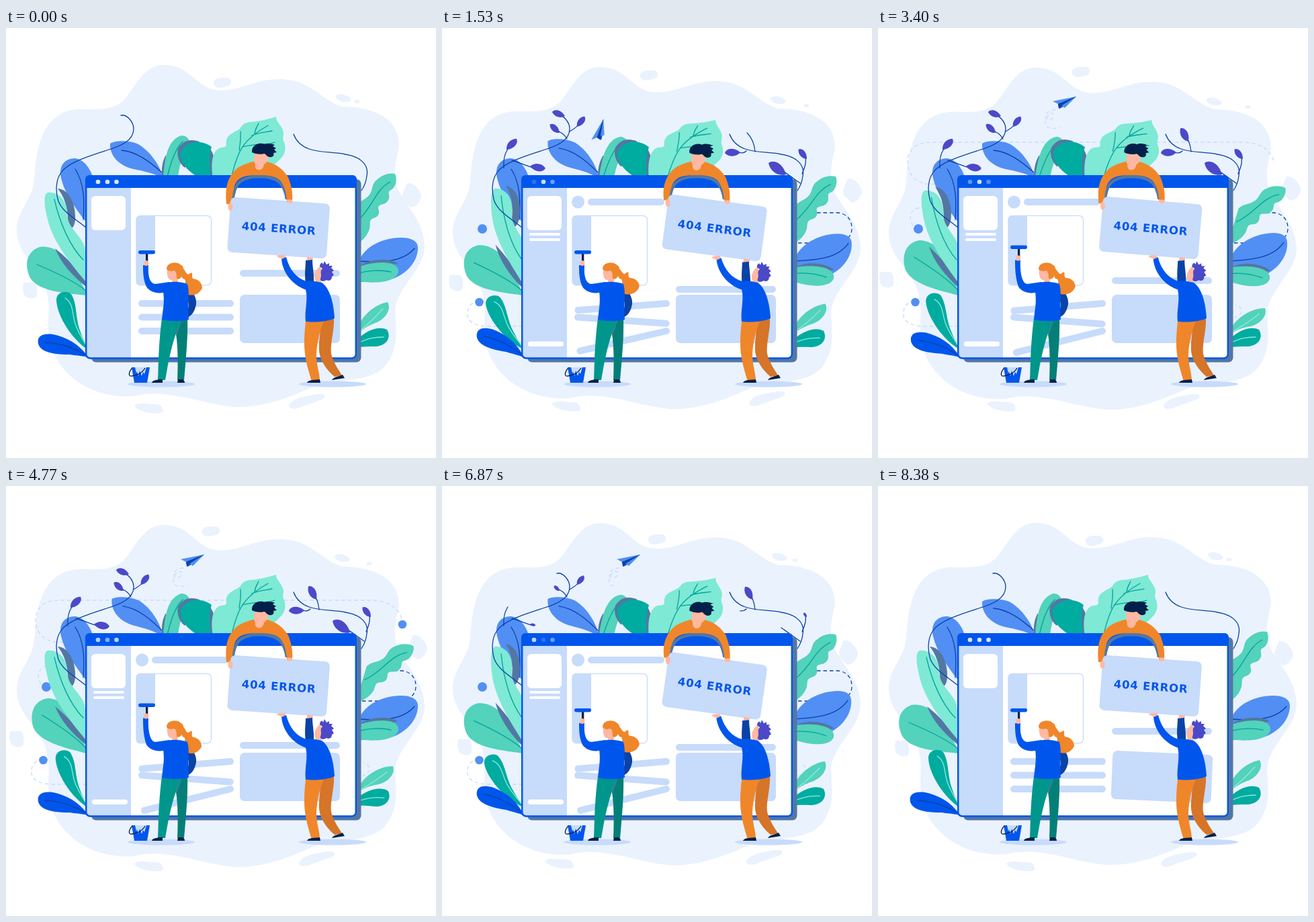
An HTML page that plays this animation: 640x640 px, repeating every 8420 ms.

```html
<!DOCTYPE html>
<html lang="en">
<head>
<meta charset="utf-8">
<title>404 error</title>
<style>
html, body { margin: 0; width: 100%; height: 100%; overflow: hidden; background: #fff }
svg { display: block; width: 100vw; height: 100vh }
.cloud { fill: #eaf2fe } .pale { fill: #c7dbfb } .blue { fill: #0056ec } .sky { fill: #528ff4 }
.deep { fill: #0a42a6 } .mint { fill: #7ee9d5 } .green { fill: #53d2bc } .teal { fill: #00aba0 }
.shade { fill: #5377a3 } .orange { fill: #f0862a } .skin { fill: #ffb8a2 } .navy { fill: #03204a }
.bud { fill: #4b49c8 } .white { fill: #fff }
.vein, .stem, .dash { fill: none; stroke-width: 1.3; stroke-linecap: round }
.vein { stroke: #00a499 } .vein.light { stroke: #8cecdc } .vein.dark, .stem { stroke: #0a42a6 }
.dash { stroke: #c7dbfb; stroke-linecap: butt }
text { font: bold 16.5px "DejaVu Sans", sans-serif; letter-spacing: .8px }
</style>
</head>
<body>
<svg viewBox="0 0 640 640">
<path id="cloud" class="cloud" d="M238 55C275 57 280 85 310 92C345 97 370 75 410 76C455 78 465 105 500 117C540 117 585 130 585 175C580 200 575 215 583 240C600 270 622 290 623 325C622 360 582 385 579 420C580 445 585 470 570 495C550 530 500 520 460 533C420 550 385 565 340 564C290 560 240 535 190 548C130 552 80 520 66 470C58 430 70 420 58 385C48 350 15 340 16 297C18 270 40 255 42 225C45 200 45 140 90 124C120 115 150 130 175 108C195 85 205 53 238 55Z"/>
<g class="cloud">
  <path data-x="0,-14,-20,-17,-9,-2" data-y="0,-11,-16,-14,-7,-2" d="M309 80C311 73 322 74 329 74C338 75 337 86 328 87C318 91 307 89 309 80Z"/>
  <path data-x="0,-2,-2,-2,0,0" data-y="0,3,5,3,2,1" d="M491 101C496 96 506 99 511 103C517 106 512 111 505 110C499 111 490 106 491 101Z"/>
  <ellipse data-x="0,20,28,18,10,3" data-y="0,6,8,6,3,1" cx="522.500" cy="109.500" rx="4" ry="2.500"/>
  <path data-x="0,7,11,9,6,1" data-y="0,-7,-10,-9,-4,-1" d="M597 231C607 229 618 243 618 252C615 261 608 269 601 266C596 259 587 257 591 245Z"/>
  <path data-x="0,-15,-23,-20,-10,-2" data-y="0,-11,-16,-14,-7,-2" d="M26 379L42 379C47 383 46 392 46 398C44 404 35 403 30 400C24 396 25 386 26 379Z"/>
  <path data-x="0,-28,-29,0,-9,-38" data-y="0,-3,-3,0,-1,-4" d="M191 562C197 556 213 560 223 560C234 560 236 572 231 573C216 575 197 571 191 562Z"/>
  <path data-x="0,36,4,15,32,32" data-y="0,-4,0,-1,-3,-3" d="M421 562C427 549 449 548 463 545C476 544 478 549 470 553C457 558 446 561 434 566C427 568 421 566 421 562Z"/>
</g>

<path class="dash" data-show="500,1400,7050,7900" style="stroke:#0a42a6" d="M530 320H585C599 319 610 312 610 298C610 287 604 277 590 275H543"/>
<path class="dash" data-show="800,1500,6900,7700" d="M55 408C40 407 37 420 38 428C40 440 55 444 70 444H119"/>
<path class="dash" data-show="1550,2200,6000,6800" d="M60 299C45 296 43 268 62 268H90"/>
<path class="dash" data-show="1550,3500,5000,6600" d="M85 232C60 235 44 220 44 200C44 180 58 170 80 170H540C572 170 589 184 590 206"/>
<path class="dash" data-show="1550,2300,6300,8420" d="M264 122C255 122 248 127 250 135C258 139 264 133 260 127C251 126 246 142 251 147C257 150 264 150 271 148"/>
<path class="dash" data-show="1550,2100,6700,7300" d="M530 432C545 425 545 418 532 412"/>
<g class="sky">
  <circle data-grow="500,1100,7200,7900" cx="60" cy="299" r="7"/>
  <circle data-grow="700,1300,7300,8000" cx="55.500" cy="408" r="6.300"/>
  <circle data-grow="3500,3900,4850,5200" cx="590" cy="206" r="6.300"/>
</g>
<g id="plane"><path class="sky" d="M-17 -1L18 -8L-7 10L-9 3Z"/><path class="blue" d="M-9 3L18 -8L-1 7L-7 10Z"/><path class="sky" d="M-4 5L18 -8L1 9Z"/><path class="deep" d="M-9 3L18 -8L-3 5L-8 10Z"/></g>

<!-- plants on the right -->
<g data-pivot="521,320" data-a="0,4,17,17,15,4">
  <path class="green" d="M521 322V266C527 256 535 256 541 248C547 240 543 232 553 225C560 218 572 215 579 217C583 225 580 238 573 241C566 244 573 250 569 256C565 265 555 260 554 268C557 276 554 281 547 283C539 286 543 293 541 299C537 312 528 318 521 322Z"/>
  <path class="vein" d="M524 286C545 268 550 240 572 229"/>
</g>
<g data-pivot="521,362" data-a="0,-5,-6,0,-1,-6">
  <path class="sky" d="M521 362C524 335 545 318 575 313C597 310 612 314 613 326C614 350 590 376 552 378L521 378Z"/>
  <path class="vein dark" d="M522 347C560 349 590 349 608 328"/>
</g>
<g data-pivot="521,362" data-a="0,9,10,0,3,10">
  <path class="shade" d="M521 358C540 342 568 342 583 350L560 358L521 368Z"/>
  <path class="green" d="M521 357C545 347 585 344 584 363C581 378 550 382 521 376Z"/>
  <path class="vein" d="M521 366C540 360 560 360 573 363"/>
</g>
<g data-pivot="521,458" data-a="0,3,10,10,9,2">
  <path class="green" d="M521 458C522 435 545 412 568 408C575 420 562 436 547 440C538 444 530 448 521 458Z"/>
  <path class="vein light" d="M521 455C535 445 550 430 561 418"/>
</g>
<g data-pivot="521,468" data-a="0,2,0,6,6,2">
  <path class="teal" d="M521 466C535 450 555 443 567 449C574 460 567 473 550 474C540 474 530 474 521 476Z"/>
  <path class="vein light" d="M521 470C540 461 550 460 562 460"/>
</g>

<!-- plants on the left -->
<g data-pivot="120,290" data-a="0,0,0,0,2,0">
  <path class="sky" d="M120 290C100 265 84 240 81 218C80 200 92 194 103 194C117 196 126 210 130 225V290Z"/>
  <path class="vein dark" d="M103 210C116 230 117 255 115 285"/>
</g>
<g data-pivot="120,395" data-a="0,2,9,9,7,2">
  <path class="green" d="M120 398C100 395 50 395 36 372C26 350 32 332 50 326C75 322 95 345 105 365C112 380 118 388 120 398Z"/>
  <path class="vein" d="M46 352C70 362 100 375 119 391"/>
</g>
<g data-pivot="119,375" data-a="0,7.5,3.5,0,3.500,7.5">
  <path class="shade" d="M77 239C94 240 104 262 103 285C102 297 97 301 93 296C91 285 95 262 77 239ZM73 328C92 344 108 360 119 375V385C98 368 82 350 73 328Z"/>
  <path class="mint" d="M119 378C100 355 70 320 62 285C57 265 55 248 62 245C76 243 91 254 91 278C92 298 112 308 117 326C120 345 119 360 119 378Z"/>
  <path class="vein" d="M72 255C80 290 95 325 115 345"/>
</g>
<g data-pivot="121,478" data-a="0,-8,-3,-1,-10,-10">
  <path class="teal" d="M121 478C100 465 76 430 75 405C75 392 90 390 97 396C106 410 103 430 110 450C114 462 118 470 121 478Z"/>
  <path class="vein light" d="M88 402C101 410 98 425 103 440C108 455 116 465 121 476"/>
</g>
<g data-pivot="120,488" data-a="0,9,3,0,9,9">
  <path class="blue" d="M121 488C108 470 90 460 70 456C52 454 46 460 48 470C52 484 75 486 95 486C108 488 115 488 121 490Z"/>
  <path class="vein dark" d="M58 468C80 469 100 475 119 487"/>
</g>

<!-- plants on top -->
<g data-pivot="232,219" data-a="0,3,0,3,0,3">
  <path class="sky" d="M234 224C230 205 214 182 195 172C180 166 160 168 155 172C154 190 168 205 190 210C205 213 220 216 234 224Z"/>
  <path class="vein dark" d="M172 182C195 184 215 200 232 215"/>
</g>
<g data-pivot="240,222" data-a="0,4,4,0,0,4">
  <path class="shade" d="M232 222C231 205 234 196 238 189V222Z"/>
  <path class="green" d="M234 222C236 195 240 165 262 160C270 161 275 166 272 176C262 190 258 205 256 222Z"/>
  <path class="vein" d="M240 222C245 200 252 180 263 169"/>
</g>
<g data-pivot="300,224" data-a="0,2.500,2.500,0,0,2.500">
  <path class="shade" d="M256 180C264 166 275 165 288 169L266 208C257 200 254 190 256 180ZM300 176C311 185 313 205 314 224H300Z"/>
  <path class="teal" d="M259 186C267 168 290 165 306 177C302 190 302 205 306 224H290C270 214 259 200 259 186Z"/>
</g>
<g data-pivot="325,222" data-a="0,3.500,3.500,0,.5,3.500">
  <path class="mint" d="M308 225C305 205 306 190 313 182C320 175 325 180 328 175C326 160 335 158 345 152C352 148 350 142 362 140C375 139 390 136 402 132C402 140 408 142 412 152C415 158 410 163 414 170C418 180 414 190 408 195C395 210 370 225 340 225Z"/>
  <path class="vein" d="M336 221C345 180 355 165 390 145M347 182C349 170 350 162 349 154M370 157C371 150 374 146 376 142M366 160C378 155 388 155 396 153M352 177C372 171 390 175 400 170"/>
</g>

<path class="stem" d="M171 130C180 128 190 140 190 150C190 168 170 176 150 182C125 190 92 200 82 215C73 228 74 245 78 258C85 275 105 285 119 297M428 158C440 190 480 182 505 188C530 192 540 205 537 220C536 230 533 236 529 242"/>
<g class="stem">
  <path data-show="200,900,7200,8000" d="M92 208C91 195 94 186 98 180"/>
  <path data-show="250,950,7200,8000" d="M104 197C115 200 125 205 133 207"/>
  <path data-show="350,1050,7200,8000" d="M186 165C182 158 178 156 172 153"/>
  <path data-show="450,1150,7200,8000" d="M190 154C195 151 200 148 202 145"/>
  <path data-show="300,1000,6500,7300" d="M453 183C448 188 442 185 436 185"/>
  <path data-show="600,1400,7200,8000" d="M466 184C465 172 460 162 454 156"/>
  <path data-show="300,1000,7200,8000" d="M536 217C541 205 543 197 540 190"/>
  <path data-show="300,1000,7200,8000" d="M533 231L505 211"/>
</g>
<g id="buds" class="bud"></g>

<!-- browser window -->
<rect class="shade" x="127" y="225" width="401.500" height="272.500" rx="7"/>
<rect class="white" x="119.500" y="220.500" width="401" height="271" rx="6"/>
<path class="pale" d="M120 236H186V491H126Q120 491 120 485Z"/>
<path class="blue" d="M118 238V226Q118 219 125 219H515Q522 219 522 226V238Z"/>
<rect x="119.200" y="220.200" width="401.600" height="271.300" rx="6" fill="none" stroke="#0056ec" stroke-width="2.500"/>
<g class="white">
  <circle data-o="1,.2,.45,.85,.4,.9" cx="137" cy="229" r="3.300"/>
  <circle data-o="1,.95,.95,.6,.5,.2" cx="151" cy="229" r="3.300"/>
  <circle data-o="1,.5,.4,.9,.25,.5" cx="164.500" cy="229" r="3.300"/>
  <rect x="127" y="250" width="51" height="51" rx="6"/>
  <rect data-wide="200,800,7200,7900" x="130" y="305" width="46" height="4" rx="2"/>
  <rect data-wide="300,900,7300,8000" x="130" y="313" width="46" height="4" rx="2"/>
  <rect data-wide="400,1000,7300,8000" x="128" y="466.500" width="53" height="7.500" rx="3.700"/>
</g>
<path class="pale" d="M222 279H200Q194 279 194 285V377Q194 383 200 383H209V324H222Z"/>
<rect x="194" y="279.300" width="111.500" height="103.500" rx="6" fill="none" stroke="#c7dbfb" stroke-width="1.300"/>
<g class="pale">
  <circle data-grow="200,900,7200,8000" cx="202.500" cy="259" r="9.500"/>
  <rect data-wide="400,1300,7100,8000" x="217" y="254" width="114" height="10" rx="5"/>
  <rect class="line" x="197" y="405" width="142" height="10" rx="5"/>
  <rect class="line" x="197" y="425.500" width="142" height="10" rx="5"/>
  <rect class="line" x="197" y="446" width="142" height="10" rx="5"/>
  <rect data-y="0,24,11,21,0,24" x="348" y="360" width="149" height="10" rx="5"/>
  <rect id="block" x="348" y="397" width="149" height="72" rx="7"/>
  <ellipse cx="231" cy="530" rx="50" ry="4.500"/>
  <ellipse cx="486" cy="530" rx="50" ry="4.500"/>
</g>

<!-- man above the window -->
<path id="armShade" fill="none" stroke="#5377a3" stroke-width="4.500"/>
<path id="arms" class="orange"/>
<g id="topHead">
  <path class="skin" d="M373 182C368 190 368 198 371 203C370 208 373 212 378 211C383 210 383 206 384 203C389 200 392 195 391 186Z"/>
  <path class="navy" d="M366 185C365 175 376 169 385 173C389 171 396 172 400 174L397 176L402 179L399 181L403 185L398 186C400 190 396 193 392 192C387 191 387 187 384 187C378 189 370 187 366 185Z"/>
</g>
<g id="card">
  <rect class="pale" x="-74" y="-41" width="148" height="82" rx="7"/>
  <text class="blue" x=".4" y="6.500" text-anchor="middle">404 ERROR</text>
</g>
<ellipse id="leftHand" class="skin" cx="334" cy="266" rx="3.500" ry="6"/>
<ellipse id="rightHand" class="skin" cx="422" cy="258" rx="4.300" ry="2.800"/>

<!-- man holding the sign -->
<g id="backArm"><path class="skin" d="M447 347L449 340L457 342L456 348Z"/><path class="deep" d="M446 346L456 345C456 355 459 368 458 380H446C444 365 446 355 446 346Z"/></g>
<path fill="#d67428" d="M466 436L488 432C489 450 482 470 484 485C488 500 496 510 500 517L489 519C478 510 467 495 466 480C465 465 470 450 466 436Z"/>
<path class="orange" d="M446 437H473C465 455 462 475 462 490C463 505 467 515 467 525L455 526C450 510 444 490 444 470C444 455 445 447 446 437Z"/>
<path class="navy" d="M448 528C450 523 460 524 467 523L468 528ZM485 524C488 519 495 519 501 516L504 521Z"/>
<g id="holderHead">
  <path class="skin" d="M468 354C460 360 457 370 461 376L461 381L468 382C469 376 471 374 473 372Z"/>
  <path class="bud" d="M467 355C467 350 471 347 472 352L474 347L477 352L481 350L481 354L486 354L484 357L488 361L485 363L488 368L485 370C485 376 480 377 477 375C473 378 467 377 468 373C471 366 466 363 471 358Z"/>
</g>
<path class="blue" d="M444 377C452 375 465 378 470 379C482 387 488 410 489 432C478 438 455 438 446 437C444 420 450 405 446 389Z"/>
<g id="frontArm"><path class="skin" d="M411 344L403 340C405 337 412 338 415 338L417 342Z"/><path class="blue" d="M410 344L417 341C422 360 432 372 447 377L448 390C430 385 412 367 410 344Z"/></g>

<!-- cleaner and bucket -->
<path class="blue" d="M187 505H214L210 528H191Z"/>
<path class="pale" d="M192 505H209L206 515L204 512L202 518L199 510L197 518L195 511L194 514Z"/>
<path d="M188 506C182 512 182 519 187 518C196 517 203 513 207 506" fill="none" stroke="#03204a" stroke-width="1.300"/>
<path class="deep" d="M266 382C280 392 284 403 283 411C281 423 275 429 271 430L270 420C274 412 272 405 266 400Z"/>
<path fill="#047f78" d="M252 432H270C271 460 268 490 265 524H255C256 500 256 475 253 455Z"/>
<path class="shade" d="M251 434H262L253 459Z"/>
<path fill="#00968c" d="M232 432H262C254 452 247 465 237 524H226C227 500 227 470 232 432Z"/>
<path class="navy" d="M217 528C218 524 224 524 228 523H233V528ZM255 528L256 523H263C266 525 266 527 266 528Z"/>
<path class="skin" d="M240 358C239 368 241 376 247 375V380C250 383 255 381 256 379L255 360Z"/>
<g data-pivot="262,360" data-a="0,-4,-4,2,-3,-4"><path class="orange" d="M258 355C267 358 266 364 271 367C281 360 275 368 278 373C288 374 292 381 292 387C288 396 278 401 266 395C261 388 270 381 266 374C260 374 262 365 258 355Z"/></g>
<path class="orange" d="M239 359C239 350 250 347 258 351C263 354 266 357 263 362C264 369 259 376 254 373C254 365 253 361 249 361C246 363 242 362 239 359Z"/>
<path class="blue" d="M236 380C245 377 262 377 270 381C274 395 270 410 272 434C258 437 245 437 232 434C234 415 236 408 234 392Z"/>
<path id="wipeArm" class="blue"/>
<g data-y="0,0,-7.500,-7.500,0,0">
  <rect class="pale" x="208.500" y="290" width="13.500" height="43"/>
  <rect class="navy" x="208" y="335" width="3.300" height="14"/>
  <ellipse class="skin" cx="208.700" cy="350" rx="3.600" ry="4"/>
  <rect class="blue" x="197" y="331" width="25" height="5.500" rx="2.700"/>
</g>
</svg>
<script>
const LOOP = 8420, KEYS = [0, 1530, 3400, 4770, 5570, 6870, LOOP];
const $ = id => document.getElementById(id);
const all = key => [...document.querySelectorAll(`[data-${key}]`)];
const nums = s => s.split(',').map(Number);
const move = (el, v) => el.setAttribute('transform', v);

const ease = (t, a, b) => {
  const x = Math.min(1, Math.max(0, (t - a) / (b - a)));
  return x * x * (3 - 2 * x);
};
const shown = (t, [a, b, c, d]) => ease(t, a, b) * (1 - ease(t, c, d));

// Eased pose between the six key times, closing on the first
function pose(t, v) {
  const i = KEYS.findIndex((k, n) => t < KEYS[n + 1]);
  return v[i] + (v[(i + 1) % 6] - v[i]) * ease(t, KEYS[i], KEYS[i + 1]);
}

// Base x, y, direction, length, times of growing and shrinking
const buds = [
  [96, 181, -45, 22, 500, 1200, 6000, 7000],
  [131, 206, 9, 23, 600, 1300, 6100, 7400],
  [175, 156, -137, 19, 750, 1400, 6300, 7600],
  [183, 131, -160, 20, 850, 1450, 5900, 6850],
  [201, 147, -52, 19, 850, 1450, 6600, 7900],
  [444, 185, 180, 23, 700, 1350, 5900, 6850],
  [462, 169, -118, 23, 1550, 2300, 6700, 7900],
  [543, 195, -128, 19, 650, 1350, 6200, 7400],
  [512, 218, -144, 31, 500, 1300, 5700, 6800],
].map(([x, y, a, len, ...times]) => {
  const el = document.createElementNS('http://www.w3.org/2000/svg', 'path');
  el.setAttribute('d', 'M0 0C.25 -.3 .7 -.34 1 -.05C.95 .2 .5 .4 0 0Z');
  $('buds').append(el);
  return t => move(el, `translate(${x} ${y}) rotate(${a}) scale(${len * shown(t, times)})`);
});

const parts = [
  ...all('a').map(el => {
    const a = nums(el.dataset.a), p = el.dataset.pivot;
    return t => move(el, `rotate(${pose(t, a)},${p})`);
  }),
  ...all('y').map(el => {
    const y = nums(el.dataset.y), x = nums(el.dataset.x || '0,0,0,0,0,0');
    return t => move(el, `translate(${pose(t, x)} ${pose(t, y)})`);
  }),
  ...all('o').map(el => {
    const o = nums(el.dataset.o);
    return t => el.setAttribute('opacity', .85 * pose(t, o));
  }),
  ...all('grow').map(el => {
    const times = nums(el.dataset.grow), r = +el.getAttribute('r');
    return t => el.setAttribute('r', r * shown(t, times));
  }),
  ...all('wide').map(el => {
    const times = nums(el.dataset.wide), w = +el.getAttribute('width');
    return t => el.setAttribute('width', w * shown(t, times));
  }),
  ...all('show').map(el => {
    const times = nums(el.dataset.show), length = el.getTotalLength();
    const dashed = el.classList.contains('dash');
    return t => {
      const v = length * shown(t, times);
      const dashes = dashed ? '5.5 4 '.repeat(v / 9.5) + Math.min(5.5, v % 9.5) : v;
      el.setAttribute('stroke-dasharray', dashes + ' 9999');
      el.setAttribute('visibility', v > .1 ? 'visible' : 'hidden');
    };
  }),
  ...buds,
];

const lines = [...document.querySelectorAll('.line')];
const tilts = [[-4.700, 334, 410], [4.300, 202, 430.5], [-14, 334, 451]];

function carry(t) {
  const phase = t * 7 / LOOP % 1;
  const d = 8 * ease(1 - Math.abs(2 * phase - 1), .2, .95);   // extra tilt in degrees
  const x = .6 * d, up = 1.6 * d;
  move($('card'), `translate(405.700 297.500) rotate(${4 + d})`);
  move($('topHead'), `translate(${x} ${.2 * d})`);
  move($('leftHand'), `translate(${x} ${-up})`);
  move($('rightHand'), `translate(${.75 * d} ${.3 * d})`);
  move($('arms'), `translate(${x} 0)`);
  move($('armShade'), `translate(${x} 0)`);
  $('arms').setAttribute('d', `M328 ${262 - up}C326 240 328 222 345 208C360 199 372 198 378 198C395 198 410 206 420 222C425 235 427 245 426 257H418C417 245 415 235 408 227C400 220 390 219 376 219C355 219 345 222 340 235C337 245 337 ${252 - up} 336 ${263 - up}Z`);
  $('armShade').setAttribute('d', `M337 ${260 - up}C339 235 345 222 376 221C407 221 415 234 418 255`);
  move($('frontArm'), `rotate(${-.65 * d} 447 380)`);
  move($('backArm'), `translate(${.25 * d} ${.8 * d})`);
  move($('holderHead'), `translate(${.5 * d} ${.3 * d})`);
}

function fly(t) {
  const a = ease(t, 900, 2200), out = ease(t, 7030, 8250);
  const x = 229 + 48 * a ** 3 + 85 * out, y = 195 - 85 * a - 75 * out;
  const size = ease(t, 850, 1450) * (1 - ease(t, 7500, 8250));
  move($('plane'), `translate(${x} ${y}) rotate(${-50 * (1 - ease(t, 1450, 2200))}) scale(${size})`);
}

function frame(now) {
  const t = now % LOOP;
  parts.forEach(draw => draw(t));
  carry(t);
  fly(t);
  move($('cloud'), `translate(0 ${pose(t, [0, 3, 4, 3, 2, .5])})`);
  const mess = shown(t, [150, 1800, 7100, 8200]);
  lines.forEach((el, i) => {
    const [a, x, y] = tilts[i];
    move(el, `rotate(${a * mess} ${x} ${y})`);
  });
  const turn = pose(t, [0, 0, 0, 0, -2, 0]) + 2.5 * ease(t, 7900, 8300);
  move($('block'), `rotate(${turn} 422.500 433)`);
  const lift = pose(t, [0, 0, 7.5, 7.5, 0, 0]), y = 353 - lift;
  $('wipeArm').setAttribute('d', `M204 ${y}H212C211 ${370 - lift} 214 380 222 381C230 380 236 379 243 378L241 392C228 397 215 394 209 385C204 ${375 - lift / 2} 204 ${362 - lift} 204 ${y}Z`);
  requestAnimationFrame(frame);
}
frame(0);
</script>
</body>
</html>
```
